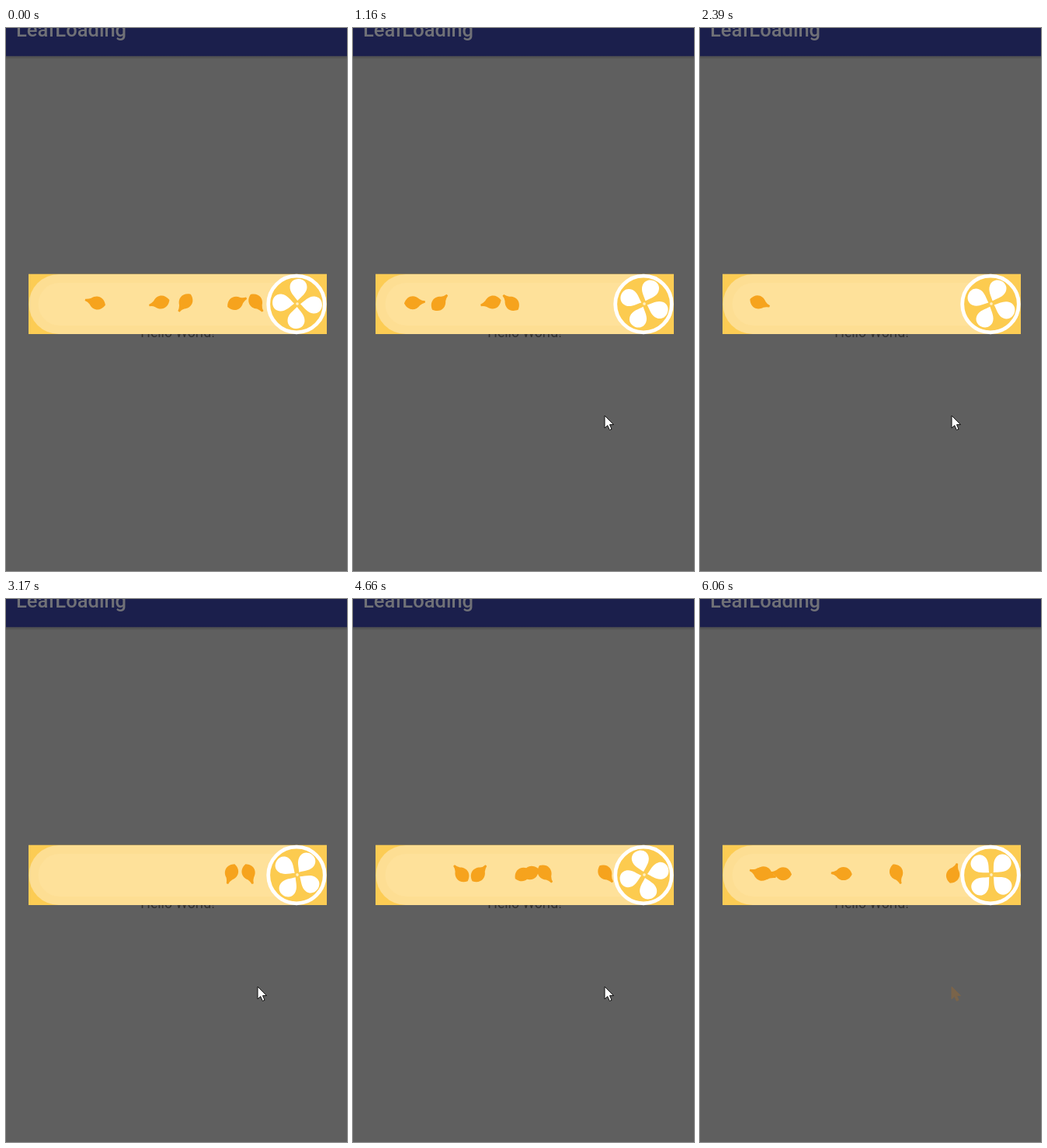
Recreate the animation shown at these times as an HTML page. Size 439 px wide and 699 px high, loop 6150 ms.

```html
<!DOCTYPE html>
<html lang="en">
<head>
<meta charset="utf-8">
<title>Leaf loading</title>
<style>
html, body { margin: 0; width: 100%; height: 100%; overflow: hidden; background: #5f5f5f; }
svg { display: block; width: 439px; height: 699px; }
text { font-family: Roboto, sans-serif; }
</style>
</head>
<body>
<svg viewBox="0 0 439 699">
  <defs>
    <linearGradient id="shade" x2="0" y2="1">
      <stop stop-color="#4e4e4e"/><stop offset="1" stop-color="#5f5f5f"/>
    </linearGradient>
    <path id="leaf" d="M-13 0C-9-10 1-11 7-4Q10-1.500 14-1.200V1.200Q10 2 7 4C1 11-9 10-13 0Z" fill="#f6a31d"/>
    <path id="petal" d="M0-4C-4-9-11-14-11-21.500C-11-28-6-32-0-32C6-32 11-28 11-21.500C11-14 4-9 0-4Z" fill="#fff"/>
    <path id="arrow" d="M0 0V16L3.700 12.600L6.400 18.500L9 17.300L6.500 11.600H11.500Z"/>
  </defs>

  <rect width="439" height="36.500" fill="#1b1f4c"/>
  <rect y="36.500" width="439" height="4" fill="url(#shade)"/>
  <text x="13" y="11" font-size="25.500" font-weight="500" fill="#707177">LeafLoading</text>
  <text x="221" y="398" font-size="17.700" text-anchor="middle" fill="#303030">Hello World!</text>

  <rect x="29" y="316.700" width="384" height="77.300" fill="#fccc54"/>
  <path d="M374 317H68A38.500 38.500 0 0 0 68 394H374Z" fill="#fdde93"/>
  <path d="M374 328H69A27.500 27.500 0 0 0 69 383H374Z" fill="#fee19a"/>
  <g id="leaves"></g>

  <circle cx="374" cy="355.500" r="36.300" fill="#fccb4f" stroke="#fff" stroke-width="4.800"/>
  <g id="fan"><circle r="1.800" fill="#fff0c4"/></g>

  <use id="ghost" href="#arrow" x="324" y="499" fill="#7a644a" stroke="#7a644a"/>
  <use id="cursor" href="#arrow" fill="#fff" stroke="#111"/>
</svg>
<script>
// The picture holds still for one step, then moves on; all rates are per step.
const LOOP = 6150, STEP = 77.75, LAST = 78;
const START_X = 362, SPEED = 7.93, LIFE = 39;
const LEAF_TURN = 12.7, FAN_TURN = -16.8;
const ENTER = 8, EXIT = 73;
const $ = id => document.getElementById(id);

// [step of birth, stem angle at birth]
const clockwise = [[-31.1, 160], [-20.7, 262], [-16.6, 274], [-8.2, 231],
  [34.8, 351], [42.1, 103], [43, 294], [64.3, 254]];
const counter = [[-5, 118], [31.9, 226], [45.6, 236], [55.4, 110], [73.5, 347]];

function addUse(parent, shape) {
  const node = document.createElementNS("http://www.w3.org/2000/svg", "use");
  node.setAttribute("href", shape);
  parent.append(node);
  return node;
}

function place(node, x, y, angle = 0) {
  node.setAttribute("transform", `translate(${x} ${y}) rotate(${angle})`);
}

function show(node, visible) {
  node.setAttribute("visibility", visible ? "visible" : "hidden");
}

const makeLeaves = (list, turn) =>
  list.map(([born, angle]) => ({ born, angle, turn, node: addUse($("leaves"), "#leaf") }));
const leaves = [...makeLeaves(clockwise, LEAF_TURN), ...makeLeaves(counter, -LEAF_TURN)];

for (let i = 0; i < 4; i++) place(addUse($("fan"), "#petal"), 0, 0, i * 90);

function render(time) {
  const k = Math.min(LAST, Math.floor((time % LOOP + 21) / STEP));
  for (const { born, angle, turn, node } of leaves) {
    const age = k - born;
    show(node, age >= 0 && age <= LIFE);
    place(node, START_X - SPEED * age, 353.5, angle + turn * age);
  }
  place($("fan"), 375, 355, 4 + FAN_TURN * k);

  // The pointer eases in from below the stage and later leaves the same way.
  const away = Math.max(0, 1 - (k - ENTER) / 3) ** 4 + Math.max(0, k - EXIT);
  place($("cursor"), 324 + 39 * away, 499 + 198 * away);
  show($("ghost"), k > EXIT);
}

const begin = performance.now();
function tick() {
  render(performance.now() - begin);
  requestAnimationFrame(tick);
}
tick();
</script>
</body>
</html>
```
